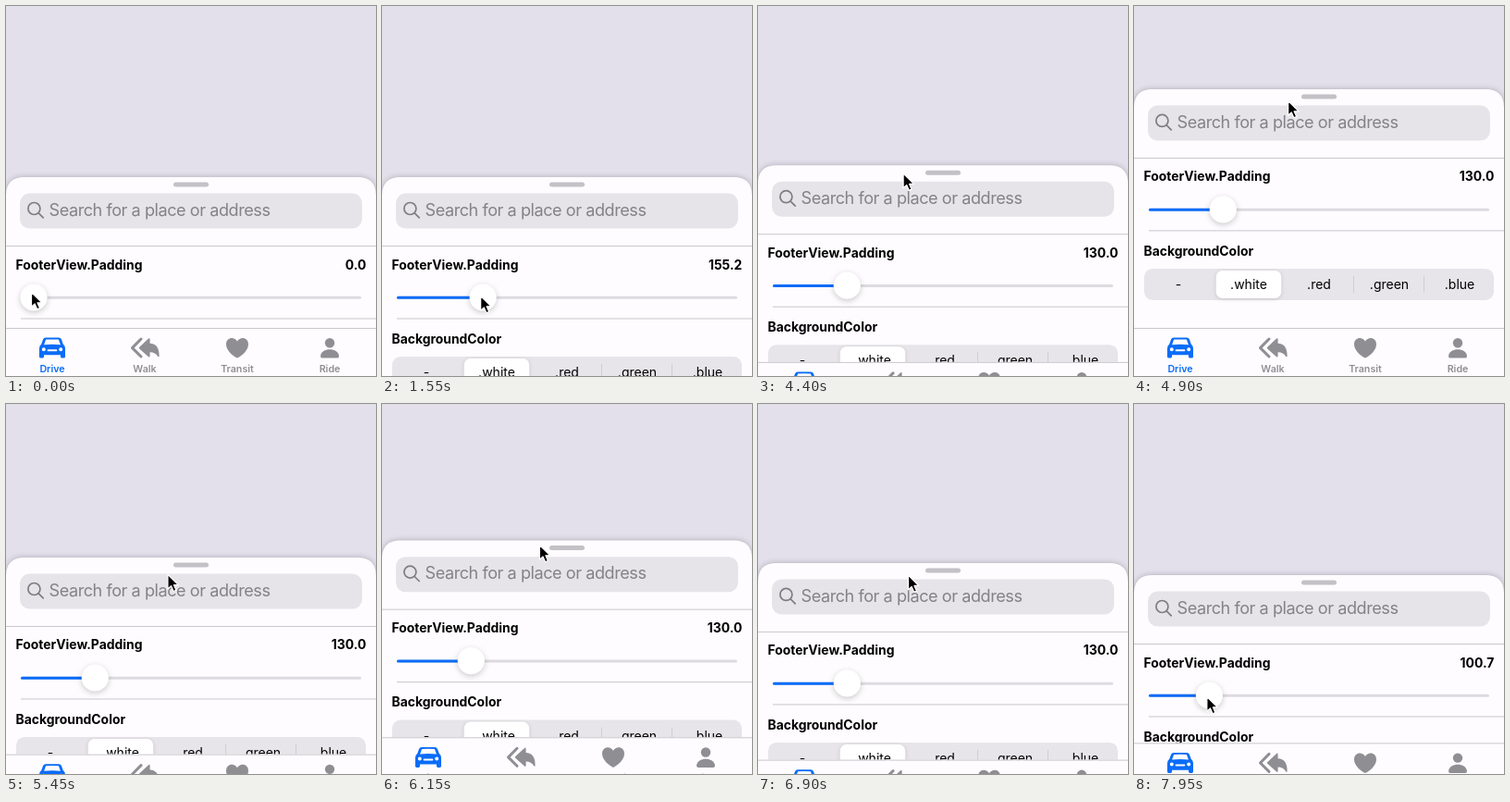
Animation, 400 px wide and 400 px high, one loop 8 s. Source, as an HTML page:

```html
<!DOCTYPE html>
<html lang="en">
<head>
<meta charset="utf-8">
<title>Bottom sheet footer padding</title>
<style>
  html, body { margin: 0; width: 100%; height: 100%; overflow: hidden; background: #e3e0eb; }
  svg { display: block; width: 100vw; height: 100vh; }
  text { font-family: Inter, "Open Sans", sans-serif; }
  .title { font-size: 13.9px; font-weight: 700; }
  .option { font-size: 14px; text-anchor: middle; }
  .tab { font-size: 10.7px; font-weight: 600; text-anchor: middle; }
  .rule { fill: #c9c7cc; }
  #sheetBack { filter: drop-shadow(0 0 3px rgba(0, 0, 0, .24)); }
  #knob { filter: drop-shadow(0 2px 3px rgba(0, 0, 0, .2)); }
  #chosen { filter: drop-shadow(0 1px 2px rgba(0, 0, 0, .14)); }
</style>
</head>
<body>
<svg viewBox="0 0 400 400">
  <rect width="400" height="400" fill="#e3e0eb"/>

  <g id="sheet">
    <path id="sheetBack" fill="#fefcfe" d="M0 420V20Q0 0 20 0H380Q400 0 400 20V420Z"/>
    <rect x="181" y="5.5" width="38" height="5" rx="2.5" fill="#c3c1c5"/>
    <rect x="15" y="17.6" width="370" height="38" rx="10.5" fill="#e6e4e8"/>
    <g fill="none" stroke="#7d7c81" stroke-width="1.7" stroke-linecap="round">
      <circle cx="30.4" cy="34" r="6.5"/>
      <path d="M35.2 38.9L40.2 43.9"/>
    </g>
    <text x="46.5" y="41.7" font-size="18.1" letter-spacing="-.45" fill="#838287">Search for a place or address</text>
    <rect class="rule" y="74" width="400" height="1"/>

    <text class="title" x="10.5" y="99.5">FooterView.Padding</text>
    <text class="title" id="value" x="389.3" y="99.5" text-anchor="end">0.0</text>
    <rect x="16" y="128.8" width="368" height="3" rx="1.5" fill="#dddbe0"/>
    <rect id="fill" x="16" y="128.8" width="14" height="3" rx="1.5" fill="#0a6cf8"/>
    <circle id="knob" cy="130" r="14.6" fill="#fff"/>
    <rect class="rule" x="16" y="152.5" width="384" height="1"/>

    <text class="title" x="10.5" y="179.6">BackgroundColor</text>
    <rect x="11" y="194" width="378" height="34" rx="9" fill="#e7e5e9"/>
    <rect id="chosen" x="88.7" y="196" width="70.5" height="30" rx="7" fill="#fff"/>
    <path d="M237.5 202V220M313.5 202V220" stroke="#cfcdd2"/>
    <g id="options"></g>
  </g>

  <g id="footer">
    <rect width="400" height="420" fill="#fefcfe"/>
    <rect class="rule" width="400" height="1"/>
    <g id="tabs"></g>
  </g>

  <path id="cursor" fill="#000" stroke="#fff" stroke-width="1.2" stroke-linejoin="round"
    d="M0 -.5V15.2L3.6 11.9L6.2 17.7L9 16.5L6.5 10.8H11.4Z"/>
</svg>

<script>
const byId = id => document.getElementById(id);
const LOOP = 8000, STEP = 50, POINT = 400 / 375;
const SHEET_TOP = 185, HEADER = 74, TAB_BAR_TOP = 348;

// Icons are centred on x = 0, with y measured from the top of the tab bar.
const icons = {
  Drive: `<path fill-rule="evenodd" d="M-7 10H7Q9.2 10 10 12L11.7 16.8Q14 18.4 14 21.4V30.6Q14 32 12.5 32H10.5Q9 32 9 30.6V28.7H-9V30.6Q-9 32 -10.5 32H-12.5Q-14 32 -14 30.6V21.4Q-14 18.4 -11.7 16.8L-10 12Q-9.2 10 -7 10Z
    M-6.9 12L-8.9 17.6Q0 16.6 8.9 17.6L6.9 12Q0 11.6 -6.9 12Z
    M-9.2 20.6A2 2 0 1 0 -9.2 24.6A2 2 0 1 0 -9.2 20.6Z
    M9.2 20.6A2 2 0 1 0 9.2 24.6A2 2 0 1 0 9.2 20.6Z
    M-4.4 22.6H4.4Q5.4 22.6 5.4 23.6T4.4 24.6H-4.4Q-5.4 24.6 -5.4 23.6T-4.4 22.6Z"/>`,
  Walk: `<path d="M-5.8 20.2L4 11Q5.6 9.8 5.6 12V16.2Q15.6 16.6 15.6 29.6Q15.6 32 14 30.2Q11.4 25.6 5.6 25.6V29.6Q5.6 31.8 4 30.6L-5.8 21.8Q-6.6 21 -5.8 20.2Z"/>
    <path d="M-4 11.4L-13.5 21L-4 30.4" fill="none" stroke="currentColor" stroke-width="3" stroke-linecap="round" stroke-linejoin="round"/>`,
  Transit: `<path d="M0 32C-4 30 -12 24.5 -12 17.2C-12 9.4 -3 8.4 0 14C3 8.4 12 9.4 12 17.2C12 24.5 4 30 0 32Z"/>`,
  Ride: `<circle cy="15.6" r="5.2"/><path d="M-10 29.8C-9 20.4 9 20.4 10 29.8Q10 32 8 32H-8Q-10 32 -10 29.8Z"/>`
};

byId('tabs').innerHTML = Object.entries(icons).map(([name, icon], i) => {
  const color = i ? '#8f8e93' : '#0a6cf8';
  return `<g transform="translate(${50 + 100 * i} 0)" fill="${color}" color="${color}">
    <g transform="translate(0 .6)">${icon}</g><text class="tab" y="48">${name}</text></g>`;
}).join('');

byId('options').innerHTML = ['-', '.white', '.red', '.green', '.blue'].map((name, i) =>
  `<text class="option" x="${48 + 76 * i}" y="216">${name}</text>`).join('');

const mix = (a, b, u) => a + (b - a) * u;
const ease = (t, from, to) => {
  const u = Math.min(1, Math.max(0, (t - from) / (to - from)));
  return (1 - Math.cos(Math.PI * u)) / 2;
};

// The slider is dragged right, back, right again, and finally left.
const padding = t => 155.2 * ease(t, 0, 1400) - 85.2 * ease(t, 1550, 2550)
  + 60 * ease(t, 2550, 3600) - 29.3 * ease(t, 7450, 7950);

// The sheet is pulled up twice and falls back each time.
const pull = (t, start, length, height) => {
  const u = (t - start) / length;
  return u > 0 && u < 1 ? height * Math.sin(Math.PI * u) ** 2 : 0;
};
const lift = t => pull(t, 4230, 1430, 96) + pull(t, 5880, 1170, 85);

// The hand leaves the slider for the sheet, leads it a little, and returns.
function cursorAt(t, knobX) {
  const onSheet = ease(t, 3700, 4200) - ease(t, 7050, 7500);
  const sheetX = 156 + 19 * ease(t, 4200, 5500) - 13 * ease(t, 5500, 7100);
  const sheetY = 199 - 5 * ease(t, 5500, 7100) - lift(t + 30);
  const sliderY = 310 + 4 * ease(t, 0, 1400) + 3 * ease(t, 2550, 3600);
  return [mix(knobX - 2.5, sheetX, onSheet), mix(sliderY, sheetY, onSheet)];
}

const move = (id, x, y) => byId(id).setAttribute('transform', `translate(${x} ${y})`);

function draw(t) {
  const pad = padding(t), top = SHEET_TOP - lift(t);
  const knobX = 30 + pad * 0.51;

  byId('value').textContent = pad.toFixed(1);
  byId('fill').setAttribute('width', knobX - 16);
  byId('knob').setAttribute('cx', knobX);
  move('sheet', 0, top);
  move('footer', 0, Math.max(TAB_BAR_TOP, top + HEADER + pad * POINT));
  move('cursor', ...cursorAt(t, knobX));
}

const start = performance.now();
function tick() {
  const t = (performance.now() - start) % LOOP;
  draw(Math.floor(t / STEP) * STEP);
  requestAnimationFrame(tick);
}
tick();
</script>
</body>
</html>
```
